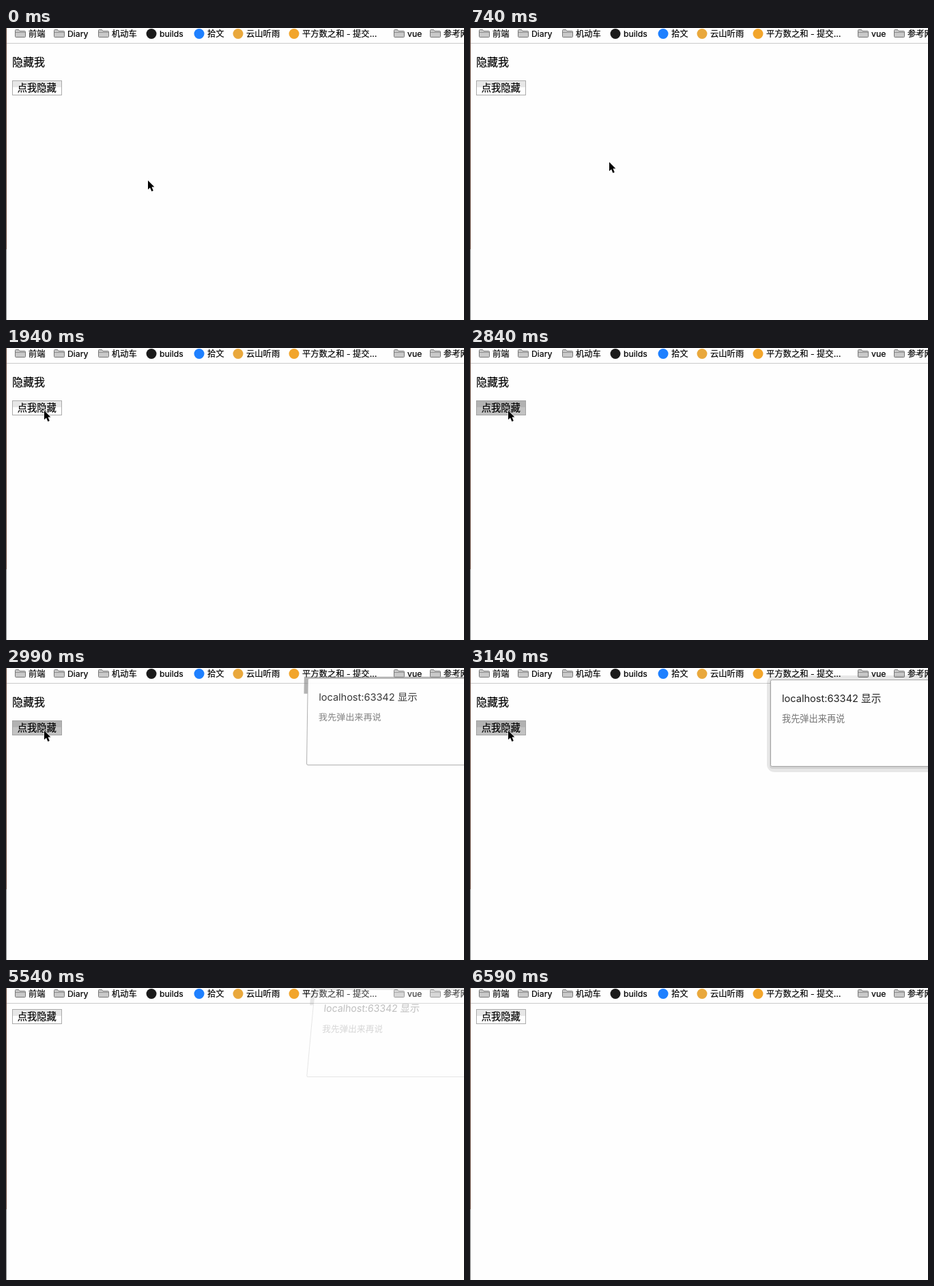
Write an HTML page that moves like this. It is 671 px wide and 429 px high and loops after 6.69 s.

```html
<!DOCTYPE html>
<html lang="zh-CN">
<head>
<meta charset="utf-8">
<title>点我隐藏</title>
<style>
  html, body { margin: 0; width: 100%; height: 100%; overflow: hidden; background: #fefefe; }
  svg { display: block; width: 100vw; height: 100vh; }
  text { font-family: Inter, "Noto Sans CJK SC", "Noto Sans CJK", sans-serif; white-space: pre; }
  .dark { fill: #000; stroke: #000; stroke-width: .2; }
  .mark { font-size: 12.3px; }
</style>
</head>
<body>
<svg viewBox="0 0 671 429" preserveAspectRatio="none">
  <defs>
    <g id="folder">
      <path d="M.5 11.5V2.5Q.5 1.5 1.5 1.5H5.5L7 3.5H14.5Q15.5 3.5 15.5 4.5V11.5Q15.5 12.5 14.5 12.5H1.5Q.5 12.5 .5 11.5Z" fill="#c9c9c9" stroke="#777"/>
      <path d="M1 5.5H15" stroke="#8c8c8c"/>
    </g>
  </defs>
  <rect width="671" height="429" fill="#fefefe"/>
  <path d="M0 22.5H671" stroke="#cbcbcb"/>
  <g id="bar"></g>
  <path d="M.5 0V325" stroke="#65483c"/>
  <path d="M.5 325V429" stroke="#858585"/>

  <text id="para" class="dark" x="9" y="56" font-size="16">隐藏我</text>
  <g id="button">
    <rect id="face" x=".5" y=".5" width="72" height="21"/>
    <rect id="shine" x="1" y="1" width="71" height="9"/>
    <text class="dark" x="7.7" y="16.3" font-size="14.3">点我隐藏</text>
  </g>

  <g id="dialog">
    <g id="shadow">
      <rect x="-6" y="-7" width="260" height="142" rx="11" fill="#000" opacity=".09"/>
      <rect x="-2" y="-1" width="250" height="131" rx="4" fill="#000" opacity=".09"/>
    </g>
    <path id="rim" d="M-6 22V-3H250V0H0V22Z" fill="#888" opacity=".7"/>
    <rect x="-.5" y="-.5" width="250" height="127" rx="2" fill="#fefefe" stroke="#a6a6a6"/>
    <text x="16" y="32" font-size="14.6" fill="#222">localhost:63342 显示</text>
    <text x="16" y="61" font-size="13.2" fill="#757575">我先弹出来再说</text>
  </g>

  <path id="cursor" d="M2 1V14.2L5 11.5L7.4 17L9.8 16L7.5 10.6H11.4Z" fill="#000" stroke="#fff" stroke-width="1.2" paint-order="stroke"/>
</svg>
<script>
const LOOP = 6690, TICK = 150;
const PRESS = 2840, OPEN = 2990, SETTLE = 3140, CLOSE = 5540, GONE = 5690;
const $ = id => document.getElementById(id);
const show = (el, on) => el.setAttribute('visibility', on ? 'inherit' : 'hidden');

// label, x, dot colour (a folder when absent)
const marks = [
  ['前端', 13], ['Diary', 70], ['机动车', 135],
  ['builds', 205, '#1b1b1b'], ['拾文', 275, '#1e80ff'],
  ['云山听雨', 332, '#e9a83c'], ['平方数之和 - 提交…', 414, '#f2a52b'],
  ['vue', 568], ['参考网站', 621]
];
$('bar').innerHTML = marks.map(([label, x, dot]) =>
  (dot ? `<circle cx="${x + 8}" cy="8.5" r="7.5" fill="${dot}"/>`
       : `<use href="#folder" x="${x}" y="1"/>`) +
  `<text class="mark dark" x="${x + 20}" y="13.2">${label}</text>`).join('');

// Bezier strokes of the hand: start, end, control points
const strokes = [
  [290, 440, [206, 223], [217, 245]],
  [590, 1040, [217, 245], [276, 207], [43, 103], [147, 226]],
  [1040, 1490, [147, 226], [164, 203], [43, 120], [46, 81]],
  [1490, 1790, [46, 81], [44, 79], [54, 91]],
  [3290, 3740, [54, 90], [-405, 79], [988, 120], [661, 128]],
  [6140, 6440, [660, 390], [610, 416], [631, 426]]
];

const mix = (a, b, p) => a.map((v, i) => v + (b[i] - v) * p);

function bezier(points, p) {
  while (points.length > 1) points = points.slice(1).map((q, i) => mix(points[i], q, p));
  return points[0];
}

// The pointer is sampled once per tick.
function pointerAt(t) {
  const s = Math.floor((t - 140) / TICK) * TICK + 140;
  const [start, end, ...points] = strokes.findLast(k => k[0] <= s) || strokes[0];
  const p = Math.max(0, Math.min(1, (s - start) / (end - start)));
  return bezier(points, p).map(Math.round);
}

function drawDialog(t) {
  const tilt = t < SETTLE ? .15 : t < CLOSE ? 0 : 1;
  const matrix = [1 - .035 * tilt, 0, -.093 * tilt, 1 + .007 * tilt, 441 + 11.9 * tilt, 18 - 14.9 * tilt];
  show($('dialog'), t >= OPEN && t < GONE);
  $('dialog').setAttribute('opacity', 1 - .72 * tilt);
  $('dialog').setAttribute('transform', `matrix(${matrix})`);
  show($('shadow'), !tilt);
  show($('rim'), tilt);
}

function draw(t) {
  $('cursor').setAttribute('transform', `translate(${pointerAt(t)})`);
  show($('cursor'), t < 3890 || t >= 6140 && t < 6590);

  const hidden = t >= CLOSE;
  const pressed = t >= PRESS && !hidden;
  show($('para'), !hidden);
  $('button').setAttribute('transform', `translate(9 ${hidden ? 31 : 77})`);
  $('face').setAttribute('fill', pressed ? '#c2c2c2' : '#fefefe');
  $('face').setAttribute('stroke', pressed ? '#a2a2a2' : '#ababab');
  $('shine').setAttribute('fill', pressed ? '#b2b2b2' : '#e7e7e7');

  drawDialog(t);
}

function tick() {
  draw(performance.now() % LOOP);
  requestAnimationFrame(tick);
}
tick();
</script>
</body>
</html>
```
